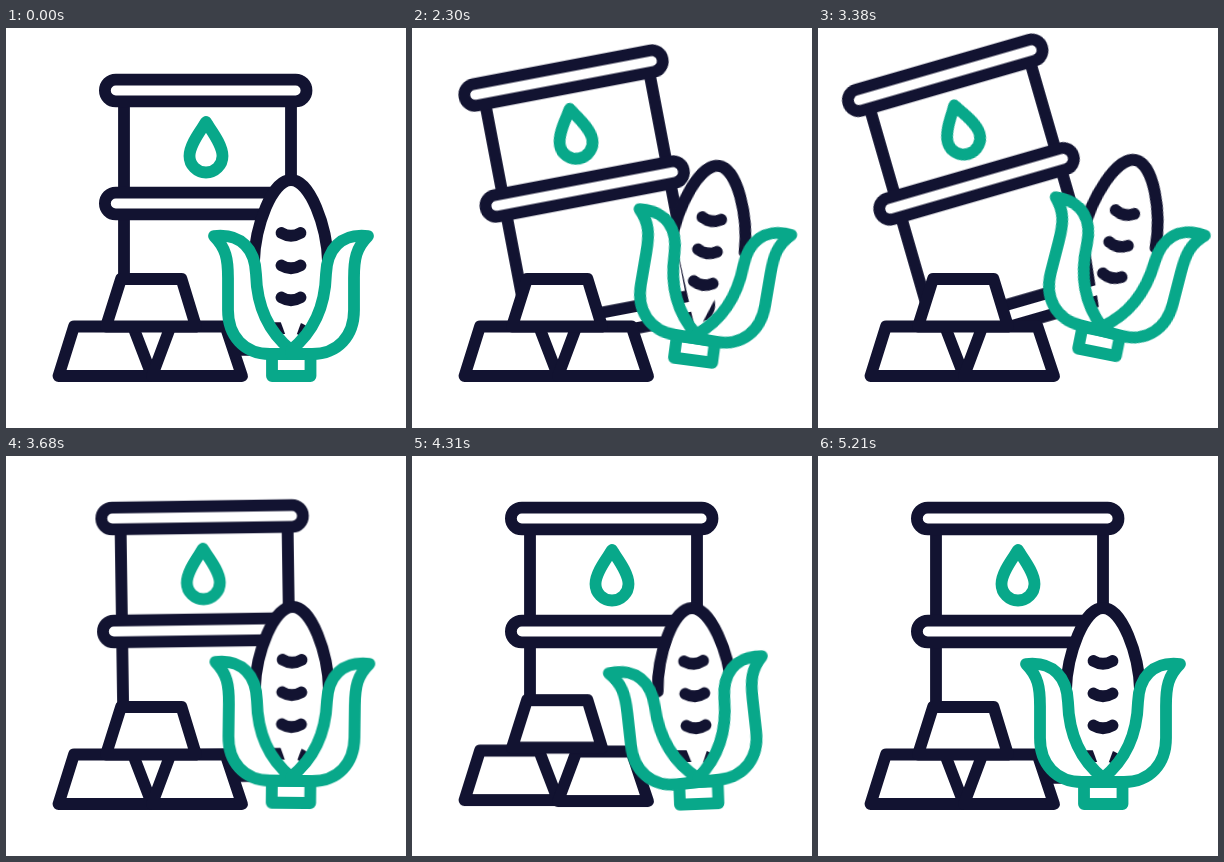
Recreate the animation shown at these times as an HTML page. Size 400 by 400 pixels, loop 5.24 s.

```html
<!DOCTYPE html>
<html lang="en">
<head>
<meta charset="utf-8">
<title>Commodities</title>
<style>
  html, body { margin: 0; width: 100%; height: 100%; overflow: hidden; background: #fff; }
  svg { display: block; width: 100%; height: 100%; }

  .line { fill: #fff; stroke: #121331; stroke-width: 11.8; stroke-linecap: round; stroke-linejoin: round; }
  .teal { stroke: #08a88a; }
  .fill { stroke: none; }

  .move { animation: 5240ms linear infinite; }
  #barrel { animation-name: tilt; transform-origin: 109.5px 311px; }
  #top-bar { animation-name: hop-top; }
  #left-bar { animation-name: hop-left; }
  #right-bar { animation-name: hop-right; }
  #corn { animation-name: shift; }
  #cob { animation-name: sway; transform-origin: 285px 322px; }
  #leaves { animation-name: flap; transform-origin: 285px 322px; }

  /* Barrel leans back, drops and rebounds once */
  @keyframes tilt {
    0% { transform: rotate(0deg); }
    38.44% { transform: rotate(0deg); animation-timing-function: cubic-bezier(.333, 1, .667, 1); }
    59.24% { transform: rotate(-18deg); animation-timing-function: cubic-bezier(.333, 0, .667, 0); }
    70.42% { transform: rotate(0deg); animation-timing-function: cubic-bezier(.333, .667, .667, 1); }
    74.62% { transform: rotate(-1.9deg); animation-timing-function: cubic-bezier(.333, 0, .667, .333); }
    78.82%, 100% { transform: rotate(0deg); }
  }

  /* The impact throws the bars up */
  @keyframes hop-top {
    0% { transform: translateY(0); }
    70.42% { transform: translateY(0); animation-timing-function: cubic-bezier(.333, .667, .667, 1); }
    76.79% { transform: translateY(-26px); animation-timing-function: cubic-bezier(.333, 0, .667, .333); }
    83.17% { transform: translateY(0); animation-timing-function: cubic-bezier(.333, .667, .667, 1); }
    87.21% { transform: translateY(-4px); animation-timing-function: cubic-bezier(.333, 0, .667, .333); }
    91.22%, 100% { transform: translateY(0); }
  }
  @keyframes hop-left {
    0% { transform: translateY(0); }
    70.42% { transform: translateY(0); animation-timing-function: cubic-bezier(.333, .667, .667, 1); }
    76.85% { transform: translateY(-13.6px); animation-timing-function: cubic-bezier(.333, 0, .667, .333); }
    83.28% { transform: translateY(0); animation-timing-function: cubic-bezier(.333, .667, .667, 1); }
    86.45% { transform: translateY(-2px); animation-timing-function: cubic-bezier(.333, 0, .667, .333); }
    89.69%, 100% { transform: translateY(0); }
  }
  @keyframes hop-right {
    0% { transform: translateY(0); }
    70.42% { transform: translateY(0); animation-timing-function: cubic-bezier(.333, .667, .667, 1); }
    77.6% { transform: translateY(-5.1px); animation-timing-function: cubic-bezier(.333, 0, .667, .333); }
    84.81% { transform: translateY(0); animation-timing-function: cubic-bezier(.333, .667, .667, 1); }
    87.79% { transform: translateY(-1.2px); animation-timing-function: cubic-bezier(.333, 0, .667, .333); }
    90.84%, 100% { transform: translateY(0); }
  }

  /* Corn: lift, sway, and leaves trailing the sway */
  @keyframes shift {
    0% { transform: translate(0, 0); }
    38.44% { transform: translate(0, 0); animation-timing-function: cubic-bezier(.333, 1, .667, 1); }
    59.24% { transform: translate(-1.2px, -26px); animation-timing-function: cubic-bezier(.333, 0, .667, 0); }
    70.42% { transform: translate(0, 0); animation-timing-function: cubic-bezier(.333, .667, .667, 1); }
    76.5% { transform: translate(-10px, .5px); animation-timing-function: cubic-bezier(.37, 0, .63, 1); }
    82.25% { transform: translate(1px, 0); animation-timing-function: cubic-bezier(.37, 0, .63, 1); }
    87.6% { transform: translate(2px, 0); animation-timing-function: cubic-bezier(.37, 0, .63, 1); }
    99.43%, 100% { transform: translate(0, 0); }
  }
  @keyframes sway {
    0% { transform: rotate(0deg); }
    38.44% { transform: rotate(0deg); animation-timing-function: cubic-bezier(.333, 1, .667, 1); }
    59.24% { transform: rotate(12.7deg); animation-timing-function: cubic-bezier(.333, 0, .667, 0); }
    70.42% { transform: rotate(0deg); animation-timing-function: cubic-bezier(.333, .667, .667, 1); }
    77.29% { transform: rotate(-6.8deg); animation-timing-function: cubic-bezier(.37, 0, .63, 1); }
    87.6% { transform: rotate(3deg); animation-timing-function: cubic-bezier(.37, 0, .63, 1); }
    99.43%, 100% { transform: rotate(0deg); }
  }
  @keyframes flap {
    0% { transform: rotate(0deg); }
    38.44% { transform: rotate(0deg); animation-timing-function: cubic-bezier(.333, 1, .667, 1); }
    59.24% { transform: rotate(3.4deg); animation-timing-function: cubic-bezier(.333, 0, .667, 0); }
    70.42% { transform: rotate(0deg); animation-timing-function: cubic-bezier(.333, .667, .667, 1); }
    78.44% { transform: rotate(-7.6deg); animation-timing-function: cubic-bezier(.37, 0, .63, 1); }
    88.93% { transform: rotate(4deg); animation-timing-function: cubic-bezier(.37, 0, .63, 1); }
    99.43%, 100% { transform: rotate(0deg); }
  }
</style>
</head>
<body>
<svg viewBox="0 0 400 400">
  <defs>
    <rect id="rim" x="98.9" y="-10.9" width="201.6" height="21.8" rx="10.9"/>
    <path id="kernel" d="M275.5 0Q285 5.5 294.5 0"/>
    <path id="leaf" d="M208 208C236 205 249 222 250 246C251 282 265 306 285 322V326H264C238 326 222 308 222 282V250C222 231 220 220 208 208Z"/>
  </defs>

  <g id="barrel" class="line move">
    <path d="M118 62V311H285V62"/>
    <use href="#rim" y="62.5"/>
    <use href="#rim" y="175.5"/>
    <use href="#rim" y="311"/>
    <path class="teal" d="M200 94C196 101 183.5 116 183.5 128A16.5 16.5 0 0 0 216.5 128C216.5 116 204 101 200 94Z"/>
  </g>

  <g class="line">
    <g id="left-bar" class="move">
      <path class="fill" d="M127 298H164L146 348Z"/>
      <path d="M68 298.5H127L146 348H52.5Z"/>
    </g>
    <path id="right-bar" class="move" d="M164.5 298.5H219.5L236 348H146Z"/>
    <path id="top-bar" class="move" d="M115 251H175.5L190 298.5H100Z"/>
  </g>

  <g id="corn" class="line move">
    <g id="cob" class="move">
      <path class="fill" d="M249 224H321L285 322Z"/>
      <path d="M248 234C249 198 266 152 285 152C304 152 321 198 322 234"/>
      <use href="#kernel" y="205"/>
      <use href="#kernel" y="237.5"/>
      <use href="#kernel" y="269.5"/>
      <rect class="teal" x="266" y="326" width="38.5" height="22"/>
      <g id="leaves" class="teal move">
        <use href="#leaf"/>
        <use href="#leaf" transform="matrix(-1 0 0 1 570 0)"/>
      </g>
    </g>
  </g>
</svg>
</body>
</html>
```
